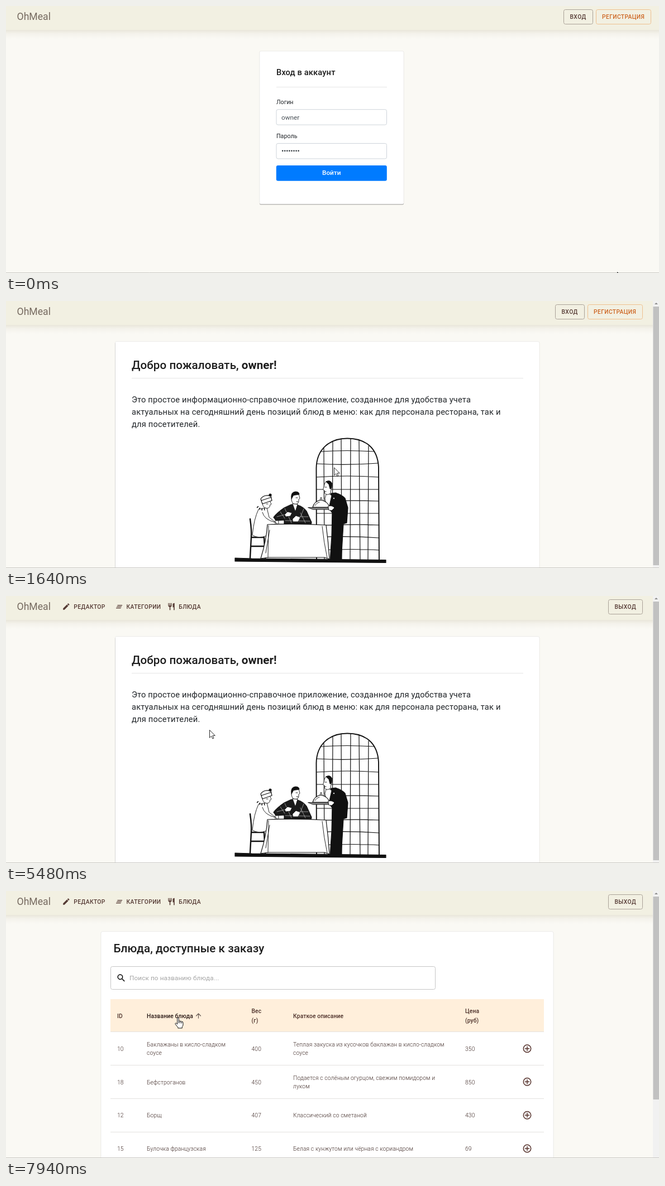
An HTML page that plays this animation: 1169 by 479 pixels, repeating every 8 s.

```html
<!DOCTYPE html>
<html lang="ru">
<head>
<meta charset="utf-8">
<title>OhMeal</title>
<style>
html, body { margin: 0; width: 100%; height: 100%; overflow: hidden; background: #faf9f4; }
svg { display: block; width: 1169px; height: 479px; }
text { font-family: Roboto, Arial, sans-serif; font-size: 11.76px; fill: #212529; white-space: pre; }
.brand { font-size: 17.64px; fill: #75695f; }
.btn text, .menu text { font-size: 10.3px; font-weight: 500; letter-spacing: .036em; fill: #553a34; }
.menu path { fill: #553a34; }
.btn rect { fill: none; stroke: #aaa298; }
.btn.reg text { fill: #cd6522; }
.btn.reg rect { stroke: #eec08f; }
.card { fill: #fff; stroke: #0001; filter: drop-shadow(0 1.3px .5px #0005); }
.h { font-weight: 500; font-size: 20.6px; letter-spacing: .003em; fill: #1d1d1d; }
.h.small { font-size: 14.7px; letter-spacing: .0075em; }
.label { font-size: 10.7px; }
.field { fill: #fff; stroke: #ced4da; }
.typed { fill: #495057; }
.rule { stroke: #e6e6e6; }
.lead { font-size: 14.7px; letter-spacing: .0115em; }
.search rect { fill: #fff; stroke: #c6c6c6; }
.search text { fill: #a5a5a5; letter-spacing: .0094em; }
.th text { font-size: 10.3px; font-weight: 500; letter-spacing: .0107em; fill: #4c3029; }
.td text { font-size: 10.3px; font-weight: 300; letter-spacing: .0107em; fill: #3f2a26; }
.foot text { font-size: 10.3px; fill: #333; letter-spacing: .0107em; }
.line { fill: none; stroke-linecap: round; stroke-linejoin: round; }
.ink { stroke: #111; stroke-width: 1.2; stroke-linejoin: round; stroke-linecap: round; }
.fine { stroke-width: .9; }

/* one 8 s clock for everything */
.a { animation: 8s step-end infinite; }
.s1 { animation-name: s1; } .s2 { animation-name: s2; }
.s3 { animation-name: s3; } .s4 { animation-name: s4; }
.auth { animation-name: auth; } .menu { animation-name: menu; } .wide { animation-name: wide; }
.hand { animation-name: hand; } .arrow { animation-name: arrow; }
.hover2 { animation-name: hover2; } .hover3 { animation-name: hover3; }
.sort { animation-name: sort; } .sorticon { animation-name: sorticon; }
#cat text, #cat path.i { animation: tint 8s linear infinite; }
#login { animation: press 8s linear infinite; }
#ring { animation: ring 8s linear infinite; }
#cursor { animation: move 8s linear infinite; }
@keyframes s1 { 0% { visibility: visible } 20.5%, 100% { visibility: hidden } }
@keyframes s2 { 0% { visibility: hidden } 20.5% { visibility: visible } 69.375%, 100% { visibility: hidden } }
@keyframes s3 { 0% { visibility: hidden } 69.375% { visibility: visible } 91%, 100% { visibility: hidden } }
@keyframes s4 { 0% { visibility: hidden } 91%, 100% { visibility: visible } }
@keyframes auth {
  0% { transform: none; visibility: visible }
  20.5% { transform: translateX(-15px); visibility: visible }
  29.625%, 100% { transform: none; visibility: hidden }
}
@keyframes menu { 0% { visibility: hidden } 29.625%, 100% { visibility: visible } }
@keyframes wide { 0% { transform: none } 69.375% { transform: translateX(var(--d)) } 91%, 100% { transform: none } }
@keyframes hand {
  0% { opacity: 0 } 8.75% { opacity: 1 } 20.5% { opacity: 0 } 49% { opacity: 1 }
  60.6% { opacity: 0 } 83.75%, 100% { opacity: 1 }
}
@keyframes arrow {
  0% { opacity: 1 } 8.75% { opacity: 0 } 20.5% { opacity: 1 } 49% { opacity: 0 }
  60.6% { opacity: 1 } 83.75%, 100% { opacity: 0 }
}
@keyframes hover2 { 0% { opacity: 0 } 49% { opacity: 1 } 55.5%, 100% { opacity: 0 } }
@keyframes hover3 { 0% { opacity: 0 } 55.5% { opacity: 1 } 60.6%, 100% { opacity: 0 } }
@keyframes tint { 0%, 49% { fill: #553a34 } 50.5%, 55.5% { fill: #1565b5 } 57%, 100% { fill: #553a34 } }
@keyframes sort { 0% { fill: #4c3029 } 83.75%, 100% { fill: #7d6a62 } }
@keyframes sorticon { 0% { opacity: 0 } 83.75%, 100% { opacity: 1 } }
@keyframes press {
  0%, 8.6% { fill: #007bff } 10.25%, 15.9% { fill: #0069d9 }
  17%, 18.2% { fill: #0062cc } 19.6%, 100% { fill: #0069d9 }
}
@keyframes ring { 0%, 15.4% { opacity: 0 } 17.5%, 20.5% { opacity: 1 } 20.6%, 100% { opacity: 0 } }
@keyframes move {
  0% { transform: translate(1094px, 477px); animation-timing-function: ease-in-out }
  10.25% { transform: translate(587px, 295px) }
  12.875%, 32.125% { transform: translate(587px, 298.5px); animation-timing-function: ease-in }
  39% { transform: translate(394px, 89px); animation-timing-function: ease-out }
  42.5% { transform: translate(314px, 71px) }
  52.125% { transform: translate(235px, 14.5px) }
  52.875% { transform: translate(235px, 14px); animation-timing-function: ease-in-out }
  57.5% { transform: translate(324px, 18px) }
  60% { transform: translate(330px, 22px) }
  63.375% { transform: translate(345px, 139px); animation-timing-function: ease-out }
  68.5% { transform: translate(364px, 240px) }
  69.375%, 76% { transform: translate(364px, 241px); animation-timing-function: ease-in-out }
  81.25% { transform: translate(257px, 230px); animation-timing-function: ease-out }
  86.5% { transform: translate(306px, 212px); animation-timing-function: step-end }
  88.25% { transform: translate(305px, 208px); animation-timing-function: step-end }
  90.125% { transform: translate(310px, 220px); animation-timing-function: step-end }
  99.25%, 100% { transform: translate(308px, 227px) }
}
</style>
</head>
<body>
<svg viewBox="0 0 1169 479">
<defs>
  <linearGradient id="shade" x2="0" y2="1">
    <stop stop-color="#e9e6db"/><stop offset=".4" stop-color="#f4f2eb"/><stop offset="1" stop-color="#faf9f4"/>
  </linearGradient>
  <path id="glass" d="M15.5 14h-.79l-.28-.27A6.5 6.5 0 1 0 13.73 14.43l.27.28v.79l5 4.99L20.49 19zM9.5 14a4.5 4.5 0 1 1 0-9 4.5 4.5 0 0 1 0 9z"/>
  <path id="up" class="line" d="M0 4.2V-4M-4 0L0 -4L4 0" stroke-width="1.2"/>
  <g id="add" class="line" stroke="#54302a" stroke-width="1.5">
    <circle r="6.7"/><path d="M-3.6 0H3.6M0 -3.6V3.6"/>
  </g>
  <g id="track">
    <path d="M1158 0H1169V479H1158z" fill="#f1f1f1"/>
    <path d="M1161 6L1164 3L1167 6z" fill="#8a8a8a"/>
  </g>
</defs>

<rect width="1169" height="479" fill="#faf9f4"/>
<rect y="43" width="1169" height="16" fill="url(#shade)"/>
<rect width="1169" height="43" fill="#f2f0e2"/>
<text class="brand" x="19.500" y="25">OhMeal</text>

<g class="a auth">
  <g class="btn"><rect x="998.500" y="6.500" width="52" height="26" rx="3"/><text x="1009.500" y="23">ВХОД</text></g>
  <g class="btn reg"><rect x="1056.500" y="6.500" width="98" height="26" rx="3"/><text x="1067" y="23">РЕГИСТРАЦИЯ</text></g>
</g>
<g class="a menu">
  <path transform="translate(100.300 11.400) scale(.63)" d="M3 17.250V21h3.750L17.810 9.940l-3.750-3.750zM20.710 7.040a1 1 0 0 0 0-1.410l-2.340-2.340a1 1 0 0 0-1.410 0l-1.830 1.830 3.750 3.750z"/>
  <text x="121.300" y="23">РЕДАКТОР</text>
  <g id="cat" class="a wide" style="--d:1.300px">
    <rect class="a hover2" x="192" y="6" width="91" height="27" rx="3" fill="#54302a" fill-opacity=".04"/>
    <path class="i" transform="translate(195.200 11.800) scale(.613)" d="M5 13h14v-2H5zm-2 4h14v-2H3zM7 7v2h14V7z"/>
    <text x="215.500" y="23">КАТЕГОРИИ</text>
  </g>
  <g class="a wide" style="--d:2.800px">
    <rect class="a hover3" x="286" y="6" width="69" height="27" rx="3" fill="#54302a" fill-opacity=".04"/>
    <path transform="translate(288.500 11.500) scale(.63)" d="M11 9H9V2H7v7H5V2H3v7a4 4 0 0 0 3.750 3.970V22h2.500v-9.030A4 4 0 0 0 13 9V2h-2zm5-3v8h2.500v8H21V2a4.500 4 0 0 0-5 4z"/>
    <text x="309.300" y="23">БЛЮДА</text>
  </g>
  <g class="a wide btn" style="--d:15px">
    <rect x="1078.500" y="6.500" width="61" height="26" rx="3"/><text x="1089.500" y="23">ВЫХОД</text>
  </g>
</g>

<g class="a s1">
  <rect class="card" x="454" y="81" width="258" height="274.500" rx="2"/>
  <text class="h small" x="484" y="123.700">Вход в аккаунт</text>
  <path class="rule" d="M484 145.500H682"/>
  <text class="label" x="484" y="176">Логин</text>
  <rect class="field" x="484" y="185.700" width="197.500" height="27.500" rx="3"/>
  <text class="typed" x="493" y="204">owner</text>
  <text class="label" x="484" y="237">Пароль</text>
  <rect class="field" x="484" y="246.500" width="197.500" height="27.500" rx="3"/>
  <path class="line" d="M495.200 259.800H525" stroke="#333a40" stroke-width="2.700" stroke-dasharray="0 4.060"/>
  <rect id="ring" x="482.200" y="284.500" width="201" height="31" rx="4" fill="#93c7ff"/>
  <rect id="login" x="483.800" y="286" width="198" height="27.800" rx="3"/>
  <text x="566" y="303" style="fill:#fff;font-weight:500">Войти</text>
</g>

<g class="a s2">
  <rect class="card" x="195.500" y="72.500" width="759.500" height="440" rx="3"/>
  <text class="h" x="225" y="122">Добро пожаловать, <tspan font-weight="700">owner!</tspan></text>
  <path class="rule" d="M225 138.500H926"/>
  <text class="lead" x="225" y="181.500">Это простое информационно-справочное приложение, созданное для удобства учета</text>
  <text class="lead" x="225" y="203.500">актуальных на сегодняшний день позиций блюд в меню: как для персонала ресторана, так и</text>
  <text class="lead" x="225" y="225.500">для посетителей.</text>

  <g class="ink" fill="#fff">
    <path d="M556 467L555.500 300C556 265 580 246.500 611 246.500S665 262 667 298L668 467z" stroke-width="1.900"/>
    <path fill="none" d="M569 264L570 466M585 252L584 466M600 247L601 466M617 247L616 466M632 250L634 466M649 260L648 466
      M563 270Q610 267 659 270M557 292Q610 295 666 291M556 316Q610 312 667 316M556 338H667M556 360Q610 357 667 359
      M556 381H667M556 403Q620 400 668 402M556 424Q610 421 668 425M556 447Q630 444 668 447"/>
    <path fill="#111" d="M410 461L440 462L680 464.500V469.500L410 467z"/>
    <!-- chair and lady -->
    <path fill="none" stroke-width="2.400" d="M437 391Q440 412 439 424L437 461M439 424H462L464 461M440 440H462"/>
    <path class="fine" d="M452 374Q444 390 441 420Q452 427 467 421L470 402L486 400L471 388L467 371z"/>
    <path class="fine" d="M459 362Q459 371 467 372Q473 371 472.500 366L475 364.500L472 358z"/>
    <path d="M456 355Q462 346 474 350L476 358L459 364z"/>
    <path fill="none" d="M457 358L475 352"/>
    <circle cx="473" cy="348" r="2" fill="#111"/>
    <path fill="none" stroke-width="3.600" stroke-dasharray="1.500 3" stroke-linecap="butt" d="M450 369Q456 376 466 373"/>
    <path class="fine" fill="none" d="M459 379Q462 392 481 397M482 390V401H488V390zM466 364H469"/>
    <!-- seated guest -->
    <path fill="#1b1b1b" d="M511 365L498 371Q485 380 479 388L484 394L498 393V401H546L547 397L538 377Q532 369 522 366z"/>
    <path class="fine" d="M512 347L511 357Q513 365 518 365Q525 364 524 356L526 354L524 346z"/>
    <path class="fine" fill="#111" d="M511 355Q509 343 518 342Q525 342 525 347L515 348.500z"/>
    <path class="fine" d="M513 364L518 378L522 365z"/>
    <path fill="none" stroke="#ddd" stroke-width=".6" d="M491 378L499 390M499 372L511 398M533 373L524 395M485 387L508 381M524 387H541M527 380L536 398M500 394L544 395"/>
    <path class="fine" d="M499 383L504 378L512 380L509 386L501 387zM513 391L519 385L527 388L523 396L514 396z"/>
    <path class="fine" fill="none" d="M519 353H522M520 360H523"/>
    <!-- table -->
    <path d="M468 401Q520 399 573 402Q577 432 579 463L570 460H470L456 462Q466 430 468 401z"/>
    <path class="fine" fill="none" d="M470 403L469 460M566 404Q569 433 575 461M472 411L465 452"/>
    <!-- waiter -->
    <path fill="#111" d="M582 345L590 344Q602 348 607 354L612 371L610 398L604 400L600 467H580L583 422L584 380L577 371L578 358z"/>
    <path class="fine" d="M574 344L571 354L573 366L579 367L583 349z"/>
    <path class="fine" d="M570 329L569 334L567.500 338L570 340V344Q574 350 581 345L583 331Q580 322 573 324z"/>
    <path class="fine" fill="#111" d="M573 324Q580 320 583.500 327L583 336L580 337L578 329z"/>
    <path class="fine" fill="none" d="M571 334H574M570 342H573"/>
    <circle class="fine" cx="587" cy="354" r="1.600"/>
    <path d="M549 370Q552 359 564 357Q577 360 579 370z"/>
    <path class="fine" fill="#888" d="M541 370.500H586L580 374H550z"/>
    <path class="fine" d="M577 368Q584 366 588 371L583 376L578 375z"/>
    <path class="fine" fill="none" d="M562 357L564 352L566 357M553 367Q556 362 561 361"/>
  </g>
  <use href="#track"/><path d="M1158.500 10H1169V474H1158.500z" fill="#c1c1c1"/>
</g>

<g class="a s3">
  <rect class="card" x="170" y="72.500" width="825.500" height="220" rx="3"/>
  <text class="h" x="192.500" y="110">Блюда, доступные к заказу</text>
  <g class="search">
    <rect x="187.500" y="135.500" width="593" height="41" rx="3"/>
    <use href="#glass" transform="translate(197.200 147) scale(.76)"/>
    <text x="221" y="160">Поиск по названию блюда...</text>
  </g>
  <path d="M187 194H978V236.500H187z" fill="#ffefdb"/>
  <path d="M187 236.500H978" stroke="#e2dcd3"/>
  <g class="th">
    <text x="199" y="220">ID</text>
    <text class="a sort" x="281" y="220">Название блюда</text>
    <use class="a sorticon" href="#up" x="374" y="216" stroke="#a8998f"/>
    <text x="478" y="220">Вес (г)</text>
    <text x="596" y="220">Краткое описание</text>
    <text x="804" y="220">Цена (руб)</text>
  </g>
  <g class="foot">
    <text x="693" y="260">Строк на странице:</text>
    <text x="806.500" y="260">5</text>
    <path d="M817.500 254.500H825L821.200 258.300z" fill="#666"/>
    <text x="853.500" y="260">0-0 из 0</text>
    <path class="line" d="M925.500 252L921.500 256L925.500 260M957 252L961 256L957 260" stroke="#b5b5b5" stroke-width="1.300"/>
  </g>
  <text class="h" x="288" y="355">Конструктор обеда в OhMeal</text>
  <text x="300" y="387" style="font-style:italic;letter-spacing:.0094em">Корзина пуста. Пожалуйста, выберите интересующие Вас позиции из списка.</text>
</g>

<g class="a s4">
  <rect class="card" x="170" y="72.500" width="810" height="440" rx="3"/>
  <text class="h" x="192.500" y="110">Блюда, доступные к заказу</text>
  <g class="search">
    <rect x="187.500" y="135.500" width="581" height="41" rx="3"/>
    <use href="#glass" transform="translate(197.200 147) scale(.76)"/>
    <text x="221" y="160">Поиск по названию блюда...</text>
  </g>
  <path d="M187 194H963V252.500H187z" fill="#ffefdb"/>
  <path d="M187 252.500H963M187 312.500H963M187 372.500H963M187 432.500H963" stroke="#e4e2df"/>
  <g class="th">
    <text x="199" y="228">ID</text>
    <text x="252" y="228" style="fill:#2a1a16">Название блюда</text>
    <use href="#up" x="344.500" y="224" stroke="#6b5d56"/>
    <text x="439.500" y="218.500">Вес</text><text x="439.500" y="236">(г)</text>
    <text x="514" y="228">Краткое описание</text>
    <text x="822" y="218.500">Цена</text><text x="822" y="236">(руб)</text>
  </g>
  <g class="td">
    <text x="199" y="286.500">10</text>
    <text x="252" y="279">Баклажаны в кисло-сладком</text><text x="252" y="294">соусе</text>
    <text x="439.500" y="286.500">400</text>
    <text x="514" y="279">Теплая закуска из кусочков баклажан в кисло-сладком</text><text x="514" y="294">соусе</text>
    <text x="822" y="286.500">350</text>
    <text x="199" y="346.500">18</text>
    <text x="252" y="346.500">Бефстроганов</text>
    <text x="439.500" y="346.500">450</text>
    <text x="514" y="339">Подается с солёным огурцом, свежим помидором и</text><text x="514" y="354">луком</text>
    <text x="822" y="346.500">850</text>
    <text x="199" y="406">12</text>
    <text x="252" y="406">Борщ</text>
    <text x="439.500" y="406">407</text>
    <text x="514" y="406">Классический со сметаной</text>
    <text x="822" y="406">430</text>
    <text x="199" y="466">15</text>
    <text x="252" y="466">Булочка французская</text>
    <text x="439.500" y="466">125</text>
    <text x="514" y="466">Белая с кунжутом или чёрная с кориандром</text>
    <text x="822" y="466">69</text>
  </g>
  <use href="#add" x="933" y="282.800"/><use href="#add" x="933" y="342.300"/>
  <use href="#add" x="933" y="402.200"/><use href="#add" x="933" y="462"/>
  <use href="#track"/><path d="M1158.500 10H1169V374H1158.500z" fill="#c1c1c1"/>
</g>

<path d="M0 478.500H1169" stroke="#c9c8c4"/>

<g id="cursor" fill="#fff" stroke="#111" stroke-linejoin="round">
  <path class="a arrow" d="M.5 .5V14.200L3.700 11.200L5.900 16L8 15L5.900 10.400H10.300z" stroke-width=".9"/>
  <path class="a hand" d="M-1.300 12V1.500Q-1.300 .3 0 .3T1.300 1.500V6.500Q2.500 5.300 3.900 6.800Q5.200 5.700 6.500 7.400Q8.800 6.700 9 9.200V13Q9 15 7.300 16.500V19H-.2V17.500L-5 11.800Q-5.300 9.800 -3.500 9.900zM1.300 6.500V10M3.900 7V10.300M6.500 7.500V10.500"/>
</g>
</svg>
</body>
</html>
```
